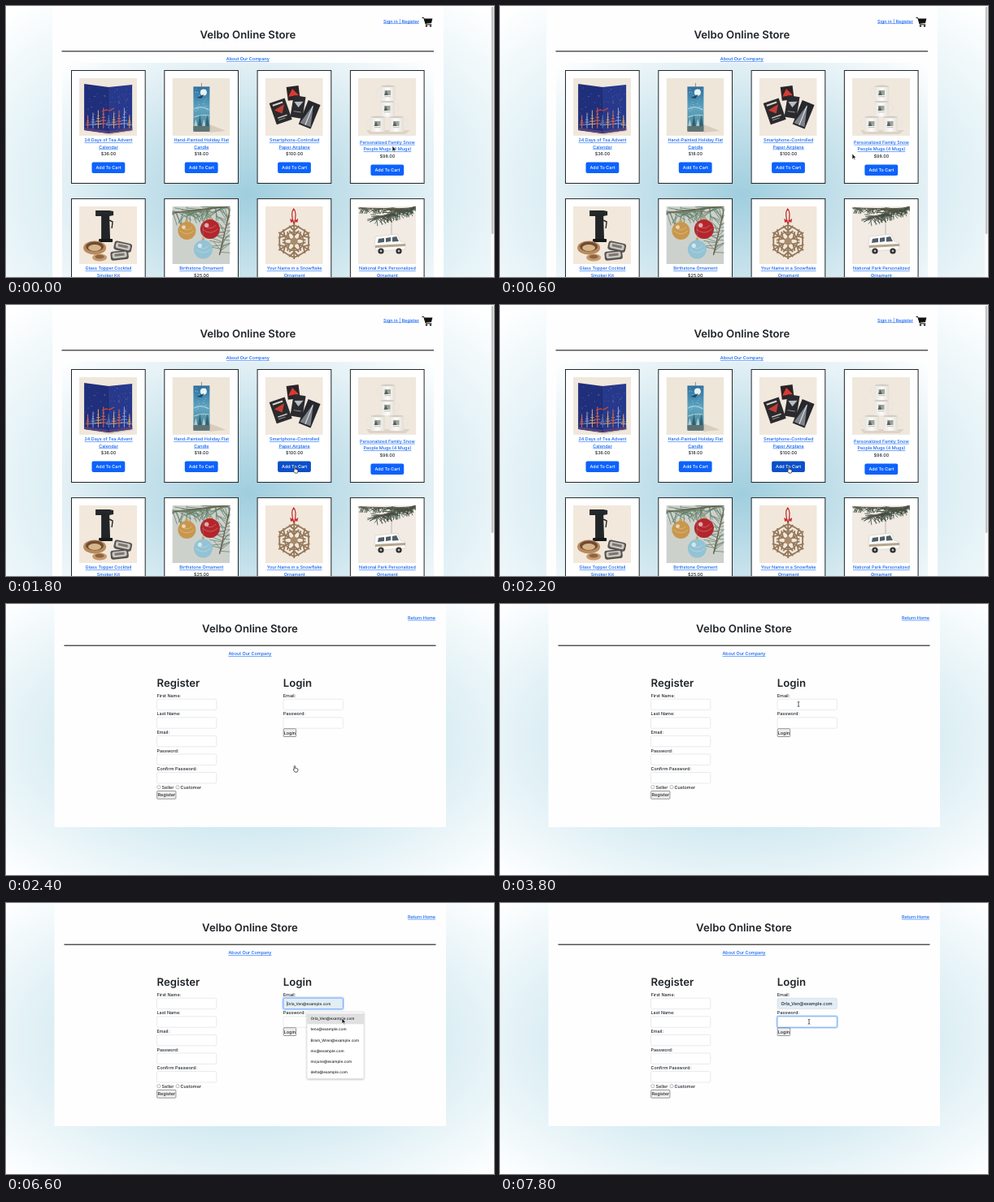
Animation, 600 px wide and 334 px high, one loop 8000 ms. Source, as an HTML page:

```html
<!DOCTYPE html>
<html lang="en">
<head>
<meta charset="utf-8">
<title>Online store</title>
<style>
  html, body { margin: 0; width: 100%; height: 100%; overflow: hidden; background: #fff; }
  svg { display: block; width: 100vw; height: 100vh; }
  text { font: 500 5.45px Inter, sans-serif; fill: #212529; white-space: pre; text-rendering: geometricPrecision; }
  .link { fill: #0d62f0; text-decoration: underline; text-decoration-thickness: .45px; }
  .h1 { font-size: 13.2px; font-weight: 600; }
  .small { font-size: 4.65px; }
  .mid { text-anchor: middle; }
  .white { fill: #fff; }
</style>
</head>
<body>
<svg id="stage" viewBox="0 0 600 334" preserveAspectRatio="none"></svg>
<script>
const STORE = 'Velbo Online Store';
const EMAILS = ['Orla_Ven@example.com', 'teno@example.com', 'Bram_Wren@example.com',
  'mo@example.com', 'mojune@example.com', 'delta@example.com'];
const LOOP = 8000, STEP = 200;

let seed = 7;
const rand = () => (seed = (seed * 16807) % 2147483647) / 2147483647;
const range = n => [...Array(n).keys()];

const rect = (x, y, w, h, fill, more = '') =>
  `<rect x="${x}" y="${y}" width="${w}" height="${h}" fill="${fill}" ${more}/>`;
const dot = (x, y, r, fill, more = '') => `<circle cx="${x}" cy="${y}" r="${r}" fill="${fill}" ${more}/>`;
const oval = (x, y, rx, ry, fill) => `<ellipse cx="${x}" cy="${y}" rx="${rx}" ry="${ry}" fill="${fill}"/>`;
const path = (d, fill, more = '') => `<path d="${d}" fill="${fill}" ${more}/>`;
const line = (d, stroke, w = 1, more = '') =>
  `<path d="${d}" fill="none" stroke="${stroke}" stroke-width="${w}" ${more}/>`;
const group = (x, y, body, turn = 0, more = '') =>
  `<g transform="translate(${x} ${y}) rotate(${turn})" ${more}>${body}</g>`;
// y is the vertical middle of the line
const text = (x, y, s, cls = '', rise = 2) => `<text x="${x}" y="${y + rise}" class="${cls}">${s}</text>`;
const tree = (x, y, w, h, fill) => path(`M${x} ${y - h}l${w / 2} ${h}h${-w}z`, fill);

// Product pictures, each 71 x 71
function calendar() {
  const stars = range(44).map(() =>
    dot(8 + rand() * 55, 12 + rand() * 34, 0.3 + rand() * 0.3, rand() < 0.6 ? '#6f8fd6' : '#c9835c')).join('');
  const fir = (x, y, s, color) => group(x, y,
    line([0, 1, 2, 3, 4].map(k => `M${-k * s * 0.3} ${k * s - 5 * s}h${k * s * 0.6}`).join('') + `M0 ${-6 * s}V2`, color, 1));
  const firs = range(9).map(i =>
    fir(10.5 + i * 6.4, 60, 2.4 + (i * 5 % 4) * 0.5, ['#d96a50', '#8ea6d8', '#e0a868'][i % 3])).join('');
  return rect(0, 0, 71, 71, '#f0e7dc') + path('M6 64L37 70 66 65V60H6z', '#d5c8b8')
    + path('M6 7L36 11V68L6 64z', '#202f7c') + path('M36 11L65 8V64L36 68z', '#26398c')
    + stars + firs + line('M28 41l5-2 4 1 6-3', '#c4493f', 1.4)
    + path('M6 61L36 65 65 61V64L36 68 6 64z', '#55407a') + line('M36 11V68', '#162058', 0.6);
}

function candle() {
  const flakes = range(24).map(() => dot(28 + rand() * 17, 13 + rand() * 36, 0.45, '#d7ebf2')).join('');
  return rect(0, 0, 71, 71, '#efe6da') + path('M46 57L66 65 46 67z', '#d8ccbd')
    + line('M36 11V6', '#5b5550', 0.6) + rect(26, 10.5, 20, 54, 'url(#wax)')
    + dot(38.5, 17.5, 4, '#e9f3f2') + path('M30 24l9-4-3 5z', '#1d4a68') + flakes
    + line('M27 38q8-5 18 1M27 48q8-4 18-2', '#a8d0de', 1.2)
    + [29, 34, 39, 43].map((x, i) => tree(x, 60, 5, 10 + i % 2 * 5, i % 2 ? '#2e6273' : '#aecbd2')).join('')
    + rect(26, 59, 20, 7, '#5d7274');
}

function plane() {
  const box = (x, y, w, h, turn, fill, body) => group(x, y, rect(0, 0, w, h, fill) + body, turn);
  return rect(0, 0, 71, 71, '#f1e8de')
    + box(26, 11, 15, 17, -7, '#2a2326', path('M1 12l6-9 7 9z', '#d83a34'))
    + box(35, 21, 15, 27, 9, '#2b2b2f', path('M2 8l11-2-5 8z', '#b9bec4') + rect(3, 19, 9, 1, '#999'))
    + box(5, 31, 20, 28, -19, '#2b2a2c', path('M3 10l14-3-6 10z', '#c53d36') + rect(3, 3, 13, 2, '#d8d4d0') + rect(4, 20, 12, 1.4, '#ccc') + rect(4, 23, 9, 1, '#999'))
    + box(53, 27, 16, 32, 22, '#26282d', path('M8 3L1 30H15z', '#7d8188') + line('M8 5V30', '#e4e6e8', 1));
}

function mugs() {
  const mug = (x, y, side) => line(`M${side > 0 ? x + 18 : x} ${y + 4}q${side * 6} 0 ${side * 5} 5t${-side * 5} 5`, '#e9e5df', 1.7)
    + rect(x, y, 18, 19, 'url(#mug)', 'rx="1.5"') + oval(x + 9, y + 1, 8.7, 1.3, '#d3cdc4')
    + rect(x + 5, y + 6, 7.5, 6, '#9ba39c') + tree(x + 7, y + 12, 5, 6, '#56665c') + rect(x + 5, y + 13.5, 7.5, 0.7, '#aaa59e');
  return rect(0, 0, 71, 71, '#f0e8dd') + path('M10 64H64L58 69H14z', '#ddd3c6')
    + mug(15, 47, -1) + mug(38, 47, 1) + mug(27, 28, 1) + mug(27.5, 9, -1);
}

function smoker() {
  const tin = (x, y, turn) => group(x, y, rect(0, 0, 22, 11, '#55524f', 'rx="3"')
    + rect(2, 1.6, 18, 7, '#c9c7c3', 'rx="2"') + rect(5, 3.4, 12, 3, '#7d756d'), turn);
  return rect(0, 0, 71, 71, '#f2e8dc')
    + path('M20 5h17l5 1v5l-5 1H20z', '#25282a') + path('M27 10h10l1 33H27z', '#222527')
    + line('M37 17l4 2-1 8', '#25282a', 1.4) + rect(24, 40, 17, 4, '#17191a', 'rx="1"')
    + oval(19, 51, 14, 8.5, '#b98a5c') + oval(19, 49.5, 11, 6, '#6d4c35') + oval(19, 51, 8, 4, '#d7b58b')
    + oval(25, 63, 9, 4.5, '#c79a6b') + oval(25, 62, 5.5, 2.4, '#8c6546')
    + tin(44, 42, 12) + tin(38, 56, -6);
}

function needles(x1, y1, x2, y2, n, len, color) {
  const spikes = range(n).map(i => {
    const k = i / n, a = rand() * 3.6 - 0.2;
    const dx = Math.cos(a) * len, dy = Math.sin(a) * len * 0.8;
    return `M${(x1 + (x2 - x1) * k).toFixed(1)} ${(y1 + (y2 - y1) * k).toFixed(1)}l${dx.toFixed(1)} ${dy.toFixed(1)}`;
  }).join('');
  return line(spikes, color, 0.8) + line(`M${x1} ${y1}L${x2} ${y2}`, '#6b5846', 1.2);
}

function ornaments() {
  const ball = (x, y, r, fill) => line(`M${x} 0V${y - r}`, '#8b8676', 0.5) + rect(x - 1.6, y - r - 2.5, 3.2, 3, '#c5a65d')
    + dot(x, y, r, fill)
    + line(`M${x - r * 0.8} ${y}q${r * 0.8} ${r * 0.7} ${r * 1.6} 0M${x - r * 0.6} ${y - r * 0.4}q${r * 0.6} ${r * 0.6} ${r * 1.2} 0`, '#fff', 0.6, 'opacity=".45"')
    + dot(x - r * 0.35, y - r * 0.4, r * 0.22, '#fff', 'opacity=".6"');
  return rect(0, 0, 71, 71, '#cdd1cc')
    + needles(0, 8, 71, 0, 70, 20, '#64806a') + needles(71, 4, 58, 60, 45, -16, '#6b8670')
    + ball(18, 30, 11, '#c9974c') + ball(46.5, 28, 12, '#b3262c') + ball(38, 53, 11.5, '#93c3d4');
}

function snowflake() {
  const arm = line('M0 0V-22M-6-19L0-13 6-19M-6-13L0-7 6-13M-9-15.6L0-20 9-15.6', '#94775a', 1.8);
  return rect(0, 0, 71, 71, '#f1e7da')
    + line('M35 21Q31 8 35 3Q39 7 36 21', '#b8262b', 1.2) + path('M35.5 18l-5-3 1 5zM35.5 18l5-3-1 5z', '#c52c31')
    + group(35.5, 43, range(6).map(i => group(0, 0, arm, i * 60)).join('')
      + dot(0, 0, 11.5, 'none', 'stroke="#94775a" stroke-width="1.5"') + dot(0, 0, 4.5, '#a98c6c'));
}

function van() {
  return rect(0, 0, 71, 71, '#f1ebe3')
    + needles(71, 0, 22, 14, 110, 13, '#3f4d42') + needles(60, 3, 0, 2, 60, 9, '#46564a')
    + line('M41 13V37', '#8d8378', 0.5)
    + path('M21 37l27-3 4 9 6 2v8l-35 2-3-6z', '#fbfaf7', 'stroke="#c9c4bc" stroke-width=".5"')
    + path('M25 40l7-1v5l-8 1zM34 39l6-1v5l-6 1zM42 38l5-1 3 6-8 .5z', '#4f5e69')
    + path('M21 48l37-2v3l-37 2z', '#b7a58c')
    + [28, 50].map(x => dot(x, 55, 3.6, '#2d2d2f') + dot(x, 55, 1.4, '#b9b9b9')).join('');
}

const PRODUCTS = [
  [calendar, ['24 Days of Tea Advent', 'Calendar'], '$36.00'],
  [candle, ['Hand-Painted Holiday Flat', 'Candle'], '$18.00'],
  [plane, ['Smartphone-Controlled', 'Paper Airplane'], '$100.00'],
  [mugs, ['Personalized Family Snow', 'People Mugs (4 Mugs)'], '$98.00'],
  [smoker, ['Glass Topper Cocktail', 'Smoker Kit'], ''],
  [ornaments, ['Birthstone Ornament'], '$25.00'],
  [snowflake, ['Your Name in a Snowflake', 'Ornament'], ''],
  [van, ['National Park Personalized', 'Ornament'], '']
];

function card([draw, title, price], i) {
  const x = 80.5 + (i % 4) * 114.3, y = i < 4 ? 79.5 : 237.6, drop = i === 3 ? 2.8 : 0;
  const lines = title.map((s, k) => text(45.5, 85.5 + drop + k * 8.6, s, 'link mid')).join('');
  return group(x, y, rect(0, 0, 90.7, 139, '#fff', 'stroke="#24272a" stroke-width="1"')
    + group(9.6, 9.4, draw(), 0, 'clip-path="url(#photo)"') + lines
    + text(45.5, 85.5 + drop + title.length * 8.6, price, 'mid')
    + rect(25, 113.1 + drop, 40.8, 13.5, '#0d62fb', `rx="2" ${i === 2 ? 'id="buy"' : ''}`)
    + text(45.5, 119.8 + drop, 'Add To Cart', 'mid white'));
}

const cart = line('M511.5 14.5h2.2l2.6 8.3h7', '#111', 1) + path('M514 15.4h10.4l-1.4 5.6-7.3 .7z', '#111')
  + dot(517, 24.6, 1.2, '#111') + dot(522, 24.6, 1.2, '#111');
const rule = (x, y, w) => rect(x, y, w, 1.2, '#2a2c2e');

const shop = `<g id="shop">${rect(0, 0, 600, 334, 'url(#shopBack)')}${rect(57, 0, 481, 334, '#fefeff')}`
  + rect(69, 70, 457, 264, 'url(#grid)')
  + text(297.3, 35, STORE, 'h1 mid', 4.9) + rule(68.5, 55.2, 457.5)
  + text(486, 18.5, 'Sign in | Register', 'link mid') + cart
  + text(297.3, 65.3, 'About Our Company', 'link mid')
  + PRODUCTS.map(card).join('') + rect(596, 0, 4, 334, '#fafafa')
  + rect(596.8, 1, 2.6, 280, '#c1c2c3', 'rx="1.2"') + '</g>';

const field = (x, y, id = '') =>
  rect(x, y, 73.3, 13.4, '#fff', `rx="1.8" stroke="#ced4da" stroke-width=".5" ${id && `id="${id}"`}`);
const button = (x, y, w, s) => rect(x, y, w, 9.8, '#efefef', 'rx=".8" stroke="#6f6f6f" stroke-width=".7"')
  + text(x + w / 2, y + 5, s, 'mid');
const radio = x => dot(x, 225.7, 2.1, '#fff', 'stroke="#767676" stroke-width=".5"');

const popup = `<g id="popup">${rect(370, 134.3, 70, 82.2, '#fff', 'rx="1.5" stroke="#cfcfcf" stroke-width=".5" filter="url(#shade)"')}`
  + rect(370, 136.2, 70, 13.1, '#e0e0e0', 'id="row"')
  + EMAILS.map((s, i) => text(374.5, 142.7 + i * 13.15, s, 'small', 1.6)).join('') + '</g>';

const account = `<g id="account">${rect(0, 0, 600, 334, 'url(#accountBack)')}${rect(59.5, 0, 481.5, 275, '#fefeff')}`
  + text(300, 30.3, STORE, 'h1 mid', 4.9) + rule(71.5, 50.6, 457)
  + text(511, 16.8, 'Return Home', 'link mid') + text(300, 61, 'About Our Company', 'link mid')
  + text(185.5, 97, 'Register', 'h1', 4.9) + text(340.8, 97, 'Login', 'h1', 4.9)
  + ['First Name:', 'Last Name:', 'Email:', 'Password:', 'Confirm Password:'].map((s, i) =>
    text(185.5, 112.8 + i * 22.6, s) + field(185.5, 117.2 + i * 22.6)).join('')
  + radio(187.8) + text(191.6, 225.7, 'Seller') + radio(211) + text(214.6, 225.7, 'Customer')
  + button(185.7, 230.4, 23.2, 'Register')
  + text(340.8, 112.8, 'Email:') + text(340.8, 135.4, 'Password:')
  + field(341, 117.2, 'email') + field(341, 139.8, 'pass') + button(341.2, 153.7, 15.4, 'Login')
  + '<g clip-path="url(#emailClip)"><text id="value" x="345.4"></text></g>'
  + line('M345.5 121.2V127', '#222', 0.5, 'id="caret"')
  + rect(341, 0, 73.3, 13.4, 'none', 'id="focus" rx="1.8" stroke="#6ea8fb" stroke-width=".8"')
  + rect(340, 0, 75.3, 15.4, 'none', 'id="glow" rx="2.6" stroke="#0d6efd" stroke-opacity=".25" stroke-width="1.3"')
  + popup + '</g>';

const pointers = {
  hand: path('M1.9.5c.6 0 .8.4.8.9v2c1 0 3.3.3 3.3 1.6 0 1.8-.5 2.6-.9 3.1H2.2C1.7 7.2.5 6.2.3 5.2c.2-.6.6-.4.9-.1V1.4c0-.5.1-.9.7-.9z', '#fff', 'stroke="#111" stroke-width=".7" transform="translate(-3 -4)"'),
  arrow: path('M0 0v6.8l1.6-1.5 1.1 2.4 1-.5-1-2.3h2.2z', '#111', 'stroke="#fff" stroke-width=".6" transform="translate(-1 -3.5)"'),
  beam: line('M-1.3-3Q0-3 0-2V2Q0 3-1.3 3M1.3-3Q0-3 0-2M0 2Q0 3 1.3 3', '#222', 0.7)
};

const radial = (id, cx, cy, rx, ry, color = '#add8e6') => `<radialGradient id="${id}" gradientUnits="userSpaceOnUse" cx="0" cy="0" r="1"
  gradientTransform="translate(${cx} ${cy}) scale(${rx} ${ry})"><stop stop-color="${color}"/><stop offset="1" stop-color="#fff"/></radialGradient>`;
const linear = (id, more, ...colors) => `<linearGradient id="${id}" ${more}>${colors.map((c, i) =>
  `<stop offset="${i / (colors.length - 1)}" stop-color="${c}"/>`).join('')}</linearGradient>`;

const stage = document.getElementById('stage');
stage.innerHTML = '<defs>' + radial('shopBack', 300, 225, 424, 300) + radial('accountBack', 300, 167, 424, 236)
  + radial('grid', 297.5, 232, 323, 230, '#a0cede')
  + linear('wax', 'x2="0" y2="1"', '#2c6f9e', '#5fa5c0', '#4a7f8e') + linear('mug', '', '#e8e4de', '#fdfcfa', '#e3ded6')
  + '<clipPath id="photo"><rect width="71" height="71"/></clipPath>'
  + '<clipPath id="emailClip"><rect x="342" y="117" width="69" height="14"/></clipPath>'
  + '<filter id="shade" x="-10%" y="-10%" width="120%" height="120%"><feDropShadow dx="0" dy=".7" stdDeviation="1" flood-opacity=".28"/></filter>'
  + '</defs>' + shop + account
  + '<g id="cursor">' + Object.entries(pointers).map(([k, body]) => `<g id="${k}">${body}</g>`).join('') + '</g>';

const $ = id => document.getElementById(id);
const show = (id, on) => $(id).setAttribute('visibility', on ? 'inherit' : 'hidden');
const set = (id, attrs) => Object.entries(attrs).forEach(([k, v]) => $(id).setAttribute(k, v));

// Cursor stops: time, x, y
const STOPS = [[0, 476, 176], [200, 475, 177], [1200, 358.5, 201.5], [1400, 356, 203], [2800, 356, 203],
  [3600, 367, 123.5], [6200, 367, 123.5], [6600, 414, 145.5], [7000, 414, 145.5], [7600, 380, 146.3], [LOOP, 380, 146.3]];

function cursorAt(t) {
  const i = STOPS.findIndex(s => s[0] > t);
  const [t0, x0, y0] = STOPS[i - 1], [t1, x1, y1] = STOPS[i];
  const k = (t - t0) / (t1 - t0), e = k * k * (3 - 2 * k);
  return [x0 + (x1 - x0) * e, y0 + (y1 - y0) * e];
}

function pointerAt(t, x, y) {
  if (t < 1400) return 'arrow';
  if (t < 2800) return 'hand';
  const list = t >= 4000 && t < 7000 && x > 370 && y > 134;
  const input = x > 341 && x < 414.3 && ((y > 117 && y < 131) || (y > 139 && y < 154));
  return input && !list ? 'beam' : 'arrow';
}

function render(now) {
  const t = Math.floor((now % LOOP) / STEP) * STEP;
  const [x, y] = cursorAt(t), kind = pointerAt(t, x, y);
  set('cursor', { transform: `translate(${x} ${y})` });
  Object.keys(pointers).forEach(k => show(k, k === kind));

  const inAccount = t >= 2400;
  show('shop', !inAccount);
  show('account', inAccount);
  set('buy', { fill: t < 1400 ? '#0d62fb' : '#0b4fc9' });

  const focused = t >= 4000, onPass = t >= 7600, filled = t >= 7000;
  const hover = t >= 6400 && !filled;
  const top = onPass ? 139.8 : 117.2;
  show('popup', inAccount && focused && !filled);
  show('row', inAccount && hover);
  show('caret', inAccount && hover);
  show('focus', inAccount && focused);
  show('glow', inAccount && focused);
  set('focus', { y: top });
  set('glow', { y: top - 1 });
  set('email', { fill: hover || filled ? '#e2edf5' : '#fff' });
  set('value', { class: filled ? '' : 'small', y: filled ? 126.1 : 126 });
  $('value').textContent = hover || filled ? EMAILS[0] : '';
}

const start = performance.now();
function tick() {
  render(performance.now() - start);
  requestAnimationFrame(tick);
}
tick();
</script>
</body>
</html>
```
